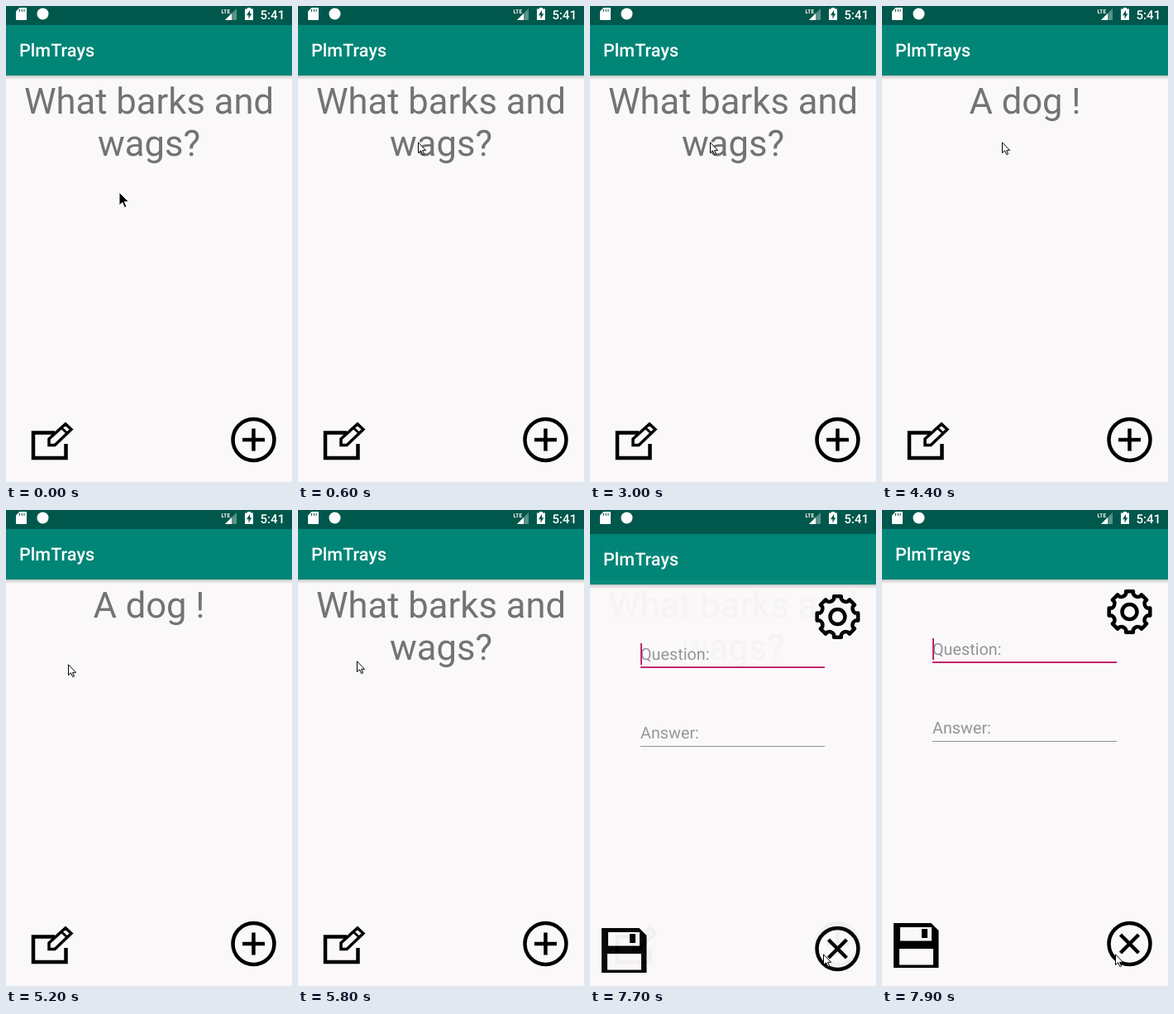
Write an HTML page that moves like this. It is 346 by 575 pixels and loops after 8 s.

```html
<!DOCTYPE html>
<html lang="en">
<head>
<meta charset="utf-8">
<title>Flash cards</title>
<style>
  html, body { margin: 0; width: 100%; height: 100%; overflow: hidden; background: #faf8f9; }
  svg { display: block; width: 346px; height: 575px; }
  text { font-family: Roboto, sans-serif; text-rendering: geometricPrecision; }
  .big { font-size: 43.6px; fill: #747374; text-anchor: middle; }
  .title { font-size: 21.6px; font-weight: 500; fill: #fff; }
  .hint { font-size: 19.8px; fill: #959496; }
  .line { fill: none; stroke: #000; stroke-width: 4.5; }
</style>
</head>
<body>
<svg viewBox="0 0 346 575">
  <defs>
    <linearGradient id="shade" x2="0" y2="1">
      <stop offset="0" stop-color="#000" stop-opacity=".2"/>
      <stop offset="1" stop-color="#000" stop-opacity="0"/>
    </linearGradient>
    <g id="frame">
      <rect width="346" height="575" fill="#faf8f9"/>
      <rect y="84" width="346" height="5" fill="url(#shade)"/>
      <rect width="346" height="84" fill="#008577"/>
      <rect width="346" height="23" fill="#00574b"/>
      <text class="title" x="16" y="61">PlmTrays</text>
    </g>
    <circle id="ring" class="line" cx="299.5" cy="524" r="25"/>
  </defs>

  <g id="card">
    <use href="#frame"/>
    <g id="question" class="big">
      <text x="173" y="130">What barks and</text>
      <text x="173" y="181">wags?</text>
    </g>
    <text id="answer" class="big" x="173" y="130">A dog !</text>
    <g class="line">
      <path d="M59 515.5H33V546H72.500V529"/>
      <path d="M52 530.500V523L72 504.800 79 511.500 59 530.500Z" stroke-width="3.500"/>
      <path d="M67 509.500 74 516" stroke-width="3"/>
      <path d="M299.500 510.500v27M286 524h27"/>
    </g>
    <use href="#ring"/>
  </g>

  <g id="form">
    <use href="#frame"/>
    <g class="line">
      <path id="gear" stroke-linejoin="round"/>
      <circle cx="299.5" cy="123" r="9"/>
      <path d="M288.500 513l22 22M310.500 513l-22 22"/>
    </g>
    <use href="#ring"/>
    <text class="hint" x="61" y="175">Question:</text>
    <text class="hint" x="61" y="270">Answer:</text>
    <path d="M61 155h2v26h-2zM61 183H284v2H61z" fill="#c2246c"/>
    <rect x="61" y="279" width="223" height="1" fill="#8f8e90"/>
    <path d="M14 499H59.500L68.500 508V553H14Z"/>
    <path d="M22 504H60V520.500H22ZM21 530H62V549.500H21Z" fill="#faf8f9"/>
    <rect x="48" y="506" width="7" height="11"/>
  </g>

  <g fill="#fff">
    <path d="M16.500 2H24Q25 2 25 3V16Q25 17 24 17H13Q12 17 12 16V6.500Z"/>
    <path d="M16.500 4v3M19.300 4v3M22 4v3" stroke="#00574b"/>
    <circle cx="44.5" cy="9.5" r="7"/>
    <text x="260.5" y="8.5" font-size="6.5" font-weight="700">LTE</text>
    <path d="M279 3V17H265Z" opacity=".35"/>
    <path d="M273 9V17H265Z"/>
    <path d="M292 2h4v1.500h3V17h-10V3.500h3Z"/>
    <path d="M295 5 291 11.300H293.500V15.500L297.200 9.300H295Z" fill="#00574b"/>
    <text x="307.5" y="16" font-size="15.1" font-weight="500">5:41</text>
  </g>

  <path id="dark" d="M0 0V16L3.800 12.500 6.400 18.500 9 17.400 6.400 11.600H11.500Z" stroke="#fff"/>
  <path id="light" d="M.5 .8V13.500L3.500 10.800 5.800 15.600 7.600 14.800 5.600 10.300H9.600Z" fill="#fff" stroke="#000"/>
</svg>
<script>
const LOOP = 8000;
const STEP = 100; // the picture only changes on this beat
const $ = id => document.getElementById(id);

const home = { x: 137, y: 225 };
const glides = [
  { from: 100, to: 400, x: 145, y: 173 },
  { from: 500, to: 600, x: 145, y: 164 },
  { from: 4400, to: 4800, x: 97, y: 207 },
  { from: 4900, to: 5300, x: 71, y: 182 },
  { from: 5800, to: 6100, x: 218, y: 386 },
  { from: 6400, to: 7000, x: 282, y: 536 }
];
const flips = [1200, 3000, 4400, 5800];
const opening = { from: 7700, to: 7900 };

const progress = (t, { from, to }) => Math.min(1, Math.max(0, (t - from) / (to - from)));
const smooth = u => u * u * (3 - 2 * u);
const show = (el, on) => el.setAttribute("visibility", on ? "visible" : "hidden");
const move = (el, x, y) => el.setAttribute("transform", `translate(${x} ${y})`);

function pointerAt(t) {
  let { x, y } = home;
  for (const g of glides) {
    const u = smooth(progress(t, g));
    x += (g.x - x) * u;
    y += (g.y - y) * u;
  }
  return [Math.round(x), Math.round(y)];
}

function gearPath(cx, cy, teeth) {
  const turn = 360 / teeth;
  const p = (r, deg) => {
    const a = deg * Math.PI / 180;
    return `${(cx + r * Math.cos(a)).toFixed(2)} ${(cy + r * Math.sin(a)).toFixed(2)}`;
  };
  let d = "";
  for (let i = 0; i < teeth; i++) {
    const a = i * turn - 90;
    d += `${i ? "L" : "M"}${p(25.2, a - 10)}L${p(25.2, a + 10)}L${p(22, a + 11.5)}`
       + `Q${p(18.5, a + turn / 2)} ${p(22, a + turn - 11.5)}`;
  }
  return d + "Z";
}
$("gear").setAttribute("d", gearPath(299.5, 123, 8));

function draw(time) {
  const t = Math.floor(time / STEP) * STEP;

  const tip = pointerAt(t);
  move($("dark"), ...tip);
  move($("light"), ...tip);
  show($("dark"), t < 200);
  show($("light"), t >= 200);

  const flipped = flips.filter(f => f <= t).length % 2 === 1;
  show($("question"), !flipped);
  show($("answer"), flipped);

  const rest = 1 - progress(t, opening);
  show($("form"), t >= opening.from);
  $("form").setAttribute("opacity", 1 - 0.035 * rest);
  move($("form"), 0, Math.round(6 * rest ** 1.6));
}

const start = performance.now();
function tick() {
  draw((performance.now() - start) % LOOP);
  requestAnimationFrame(tick);
}
tick();
</script>
</body>
</html>
```
